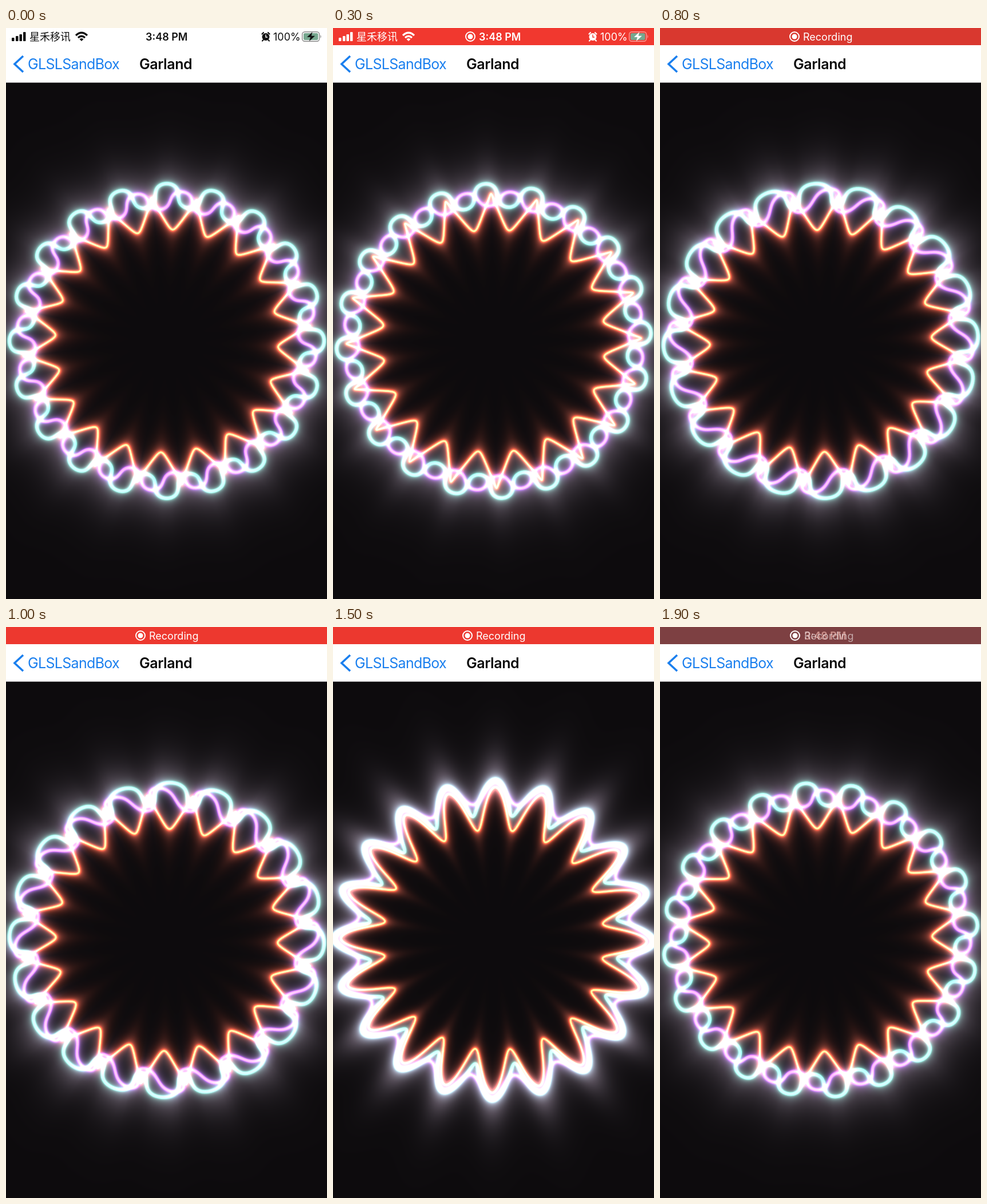
Write an HTML page with a canvas that moves like this. It is 561 px wide and 998 px high and loops after 2000 ms.

```html
<!DOCTYPE html>
<html lang="en">
<head>
<meta charset="utf-8">
<title>Garland</title>
<style>
  html, body { margin: 0; width: 100%; height: 100%; overflow: hidden; background: #0d0b0d; }
  canvas, svg { position: absolute; left: 0; display: block; }
  canvas { top: 96px; }
  svg { top: 0; font-family: Inter, Roboto, sans-serif; font-size: 18px; }
  .cjk { font-family: "Noto Sans CJK SC", "Noto Sans CJK", sans-serif; }
  .bold { font-weight: 600; }
  .nav { font-size: 25px; }
</style>
</head>
<body>
<canvas id="ring" width="561" height="902"></canvas>
<svg width="561" height="96" viewBox="0 0 561 96">
  <rect width="561" height="95.500" fill="#fff"/>
  <rect id="bar" width="561" height="30" fill="#fff"/>
  <g id="sides" fill="currentColor">
    <rect x="10" y="17" width="4.5" height="6" rx="1"/>
    <rect x="17" y="14" width="4.5" height="9" rx="1"/>
    <rect x="23.500" y="11" width="4.5" height="12" rx="1"/>
    <rect x="30" y="7" width="4.5" height="16" rx="1"/>
    <text class="cjk" x="41" y="22">星禾移讯</text>
    <g fill="none" stroke="currentColor" stroke-width="3.2">
      <path d="M122 13Q132 3.500 142 13"/>
      <path d="M126 17Q132 11.500 138 17"/>
    </g>
    <path d="M128.500 19.500Q132 16.500 135.500 19.500L132 23Z"/>
    <circle cx="454" cy="15.500" r="6.500"/>
    <g fill="none" stroke="currentColor" stroke-width="2.200" stroke-linecap="round">
      <path d="M447.500 10.500L450 8M460.500 10.500L458 8M449.500 21L448 22.500M458.500 21L460 22.500"/>
    </g>
    <path id="hands" d="M454 11.500V16H457" fill="none" stroke="#fff" stroke-width="1.400"/>
    <text x="467" y="21.500">100%</text>
    <rect x="517.700" y="6.700" width="30" height="16.600" rx="4.500" fill="none" stroke="currentColor" stroke-opacity=".5" stroke-width="1.400"/>
    <rect x="520" y="9" width="25.500" height="12" rx="2.500" fill="#76a78f"/>
    <path d="M549.500 12Q552 15 549.500 18Z" fill-opacity=".5"/>
    <path d="M535.500 7L526 16H532L530 23L540 13.700H533.700Z"/>
  </g>
  <g id="dot">
    <circle r="8" fill="none" stroke="#fff" stroke-width="2"/>
    <circle r="4.500" fill="#fff"/>
  </g>
  <text id="clock" class="bold" y="21.500">3:48 PM</text>
  <text id="rec" x="250" y="21.500" fill="#fff">Recording</text>
  <path d="M30 49L15 63L30 77" fill="none" stroke="#1a7fee" stroke-width="3.600"/>
  <text class="nav" x="38" y="72" fill="#1a7fee" letter-spacing="-.68">GLSLSandBox</text>
  <text class="nav bold" x="233" y="72" fill="#0b0b0b" letter-spacing="-.43">Garland</text>
</svg>
<script>
const W = 561, H = 902, CX = 281, CY = 451;
const PETALS = 20, TAU = Math.PI * 2;
const COLS = 128, ROW = COLS + 1, R0 = 60, ROWS = 400, SEGS = 64;
const BACK = [13, 11, 13], HALO = [66, 60, 68];
const KEYS = [0, .3, .8, 1, 1.3, 1.7, 1.9];

// Each pose: peak offset in degrees, mean radius, amplitude,
// then the tangential terms: bulge, meander, lean.
const STRANDS = [
  { rgb: [255, 75, 35], inner: .32, core: 3.2, poses: [
    [9, 223, 28, -.45, -.18, 0], [9, 226, 31, -.4, -.15, 0],
    [9, 224, 30, -.42, -.15, 0], [9, 224, 30, -.42, -.15, 0],
    [9, 230, 37, .05, 0, 0], [9, 230, 37, .05, 0, 0], [9, 224, 29, -.45, -.18, 0]] },
  { rgb: [150, 62, 225], inner: .06, core: 1.7, poses: [
    [3, 246, 16, 0, .28, 0], [-1, 249, 13, 0, .2, 0],
    [-12, 247, 19, .1, .35, .75], [-23, 247, 19, .1, .35, -.75],
    [-27, 257, 18, -.1, 0, 0], [-27, 257, 18, -.1, 0, 0], [-33, 248, 14, 0, .28, 0]] },
  { rgb: [90, 215, 178], inner: .06, core: 1.15, poses: [
    [-3, 255, 20, 0, .4, 0], [-11, 255, 20, 0, .35, 0],
    [-18, 256, 19, .6, .35, .1], [-18, 256, 19, .6, .35, -.1],
    [-27, 250, 31, .3, 0, .2], [-27, 250, 31, .3, 0, .2], [-22, 255, 20, 0, .4, 0]] }
];

const ctx = document.getElementById("ring").getContext("2d");
const table = new Float32Array(ROW * ROWS * 3);
const cell = new Int32Array(W * H), fracX = new Float32Array(W * H), fracY = new Float32Array(W * H);

// Every pixel maps into one polar wedge that repeats around the ring.
for (let y = 0, p = 0; y < H; y++) {
  for (let x = 0; x < W; x++, p++) {
    const dx = x + .5 - CX, dy = y + .5 - CY;
    const turn = Math.atan2(dx, -dy) / TAU * PETALS;
    const col = (turn - Math.floor(turn)) * COLS;
    const row = Math.hypot(dx, dy) - R0;
    const c = Math.min(COLS - 1, Math.floor(col)), r = Math.floor(row);
    cell[p] = row < 0 || r >= ROWS - 1 ? -1 : (r * ROW + c) * 3;
    fracX[p] = col - c;
    fracY[p] = row - r;
  }
}

function poseAt(poses, t) {
  let i = KEYS.length - 1;
  while (KEYS[i] > t) i--;
  if (i === KEYS.length - 1) return poses[i];
  const f = (t - KEYS[i]) / (KEYS[i + 1] - KEYS[i]);
  return poses[i].map((v, j) => v + (poses[i + 1][j] - v) * f);
}

function curve(pose, t) {
  const [off, mid, amp, bulge, meander, lean] = pose;
  const start = (3 + 16.4 * t + off) / 360 * TAU * PETALS;
  return u => [
    start + u + bulge * Math.sin(u) + meander * Math.sin(2 * u) + lean * (Math.cos(u) - 1),
    mid + amp * Math.cos(u)
  ];
}

// Innermost radius and softened outermost radius for each column.
function envelope(at) {
  const lo = new Float32Array(COLS).fill(1e3), hi = new Float32Array(COLS);
  for (let i = 0; i < 640; i++) {
    const [a, r] = at(i / 640 * TAU);
    const c = ((Math.round(a / TAU * COLS) % COLS) + COLS) % COLS;
    lo[c] = Math.min(lo[c], r);
    hi[c] = Math.max(hi[c], r);
  }
  const reach = 20;
  const rim = hi.map((_, c) => {
    let sum = 0;
    for (let k = -reach; k <= reach; k++) sum += hi[(c + k + COLS) % COLS];
    return sum / (2 * reach + 1);
  });
  return { lo, rim };
}

function lineDistance(ang, rad, a, r) {
  const k = r / PETALS;
  let best = 1e6;
  for (let i = 0; i < SEGS; i++) {
    let d = ang[i] - a;
    d -= Math.round(d / TAU) * TAU;
    const x = d * k, y = rad[i] - r;
    const ex = (ang[i + 1] - ang[i]) * k, ey = rad[i + 1] - rad[i];
    const f = Math.max(0, Math.min(1, -(x * ex + y * ey) / (ex * ex + ey * ey + 1e-9)));
    const qx = x + ex * f, qy = y + ey * f, q = qx * qx + qy * qy;
    if (q < best) best = q;
  }
  return Math.sqrt(best);
}

function addStrand(strand, t) {
  const at = curve(poseAt(strand.poses, t), t);
  const ang = [], rad = [];
  for (let i = 0; i <= SEGS; i++) {
    const [a, r] = at(i / SEGS * TAU);
    ang.push(a);
    rad.push(r);
  }
  const { lo, rim } = envelope(at);
  for (let j = 0, q = 0; j < ROWS; j++) {
    const r = R0 + j, near = r > 165 && r < 310;
    for (let i = 0; i <= COLS; i++, q += 3) {
      const c = i % COLS, out = r - rim[c];
      const halo = Math.exp(out > 0 ? -out / 31 : out / 10);
      let glow = r < lo[c] ? strand.inner * Math.exp((r - lo[c]) / 25) : .06 * Math.exp(-Math.max(0, out) / 10);
      if (near) {
        const d = lineDistance(ang, rad, i / COLS * TAU, r) + .01;
        if (d < 22) glow += Math.min(strand.core, Math.max(0, Math.pow(2.2 / d, 1.4) - .04));
      }
      for (let n = 0; n < 3; n++) table[q + n] += strand.rgb[n] * glow + HALO[n] * halo;
    }
  }
}

function paintRing(t) {
  table.fill(0);
  for (const s of STRANDS) addStrand(s, t);
  const img = ctx.createImageData(W, H), out = img.data, down = ROW * 3;
  for (let p = 0, o = 0; p < W * H; p++, o += 4) {
    const q = cell[p], fx = fracX[p], fy = fracY[p];
    for (let n = 0; n < 3; n++) {
      let v = BACK[n];
      if (q >= 0) {
        const i = q + n;
        const top = table[i] + (table[i + 3] - table[i]) * fx;
        const low = table[i + down] + (table[i + down + 3] - table[i + down]) * fx;
        v += top + (low - top) * fy;
      }
      out[o + n] = v;
    }
    out[o + 3] = 255;
  }
  return img;
}

const el = id => document.getElementById(id);
const set = (id, attrs) => { for (const k in attrs) el(id).setAttribute(k, attrs[k]); };
const show = (id, on) => set(id, { visibility: on ? "visible" : "hidden" });

function paintBar(step) {
  const idle = step === 0, fading = step === 19, recording = step >= 7;
  const wave = .5 + .5 * Math.cos(TAU * (step / 10 - .78) / .92);
  const red = Math.round(241 - 24 * wave ** 3);
  const fill = idle ? "#fff" : fading ? "rgb(125,64,66)" : `rgb(${red},56,47)`;
  set("bar", { fill });
  set("sides", { color: idle ? "#111" : "#fff" });
  set("hands", { stroke: fill });
  set("dot", { transform: `translate(${fading ? 236 : recording ? 235 : 240} 15)` });
  set("clock", {
    x: idle ? 244 : fading ? 252 : 255,
    fill: idle ? "#111" : fading ? "#e5a9a3" : "#fff",
    "fill-opacity": fading ? .75 : 1
  });
  set("rec", { x: fading ? 252 : 250, "fill-opacity": fading ? .55 : 1 });
  show("sides", !recording);
  show("dot", !idle);
  show("clock", !recording || fading);
  show("rec", recording);
}

const cache = [];
let shown = -1;
const begin = performance.now();

function tick() {
  const step = Math.floor(((performance.now() - begin) % 2000) / 100);
  if (step !== shown) {
    shown = step;
    cache[step] = cache[step] || paintRing(step / 10);
    ctx.putImageData(cache[step], 0, 0);
    paintBar(step);
  }
  requestAnimationFrame(tick);
}
tick();
</script>
</body>
</html>
```
